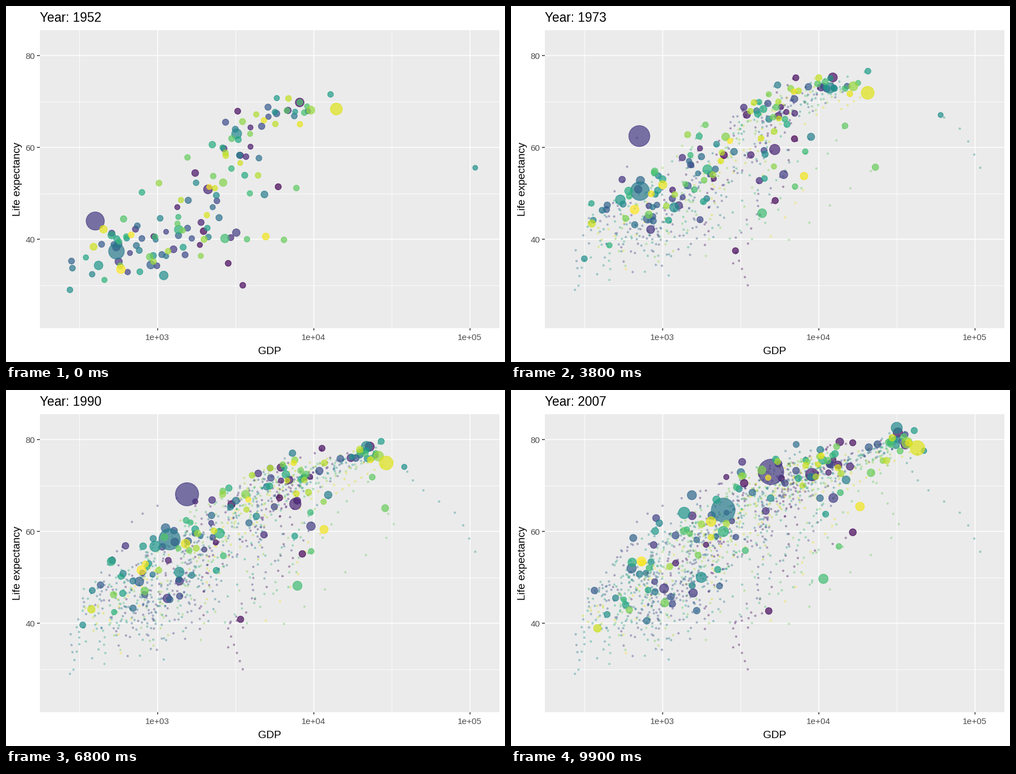
Write a matplotlib script that moves like this. It is 885 px wide and 632 px high and loops after 10000 ms.

```python
import numpy as np
import matplotlib.pyplot as plt
from matplotlib.animation import FuncAnimation

W, H, DPI = 885, 632, 100
FRAMES, STEP = 100, 9              # one survey year every STEP frames
SURVEYS, N = 12, 142
U = np.linspace(0, 1, SURVEYS)     # progress from 1952 to 2007
PT = 72 / DPI                      # points per pixel

plt.rcParams["font.family"] = "Liberation Sans"


def size_of(pop):
    """Bubble size in mm for a population in millions."""
    return 2 + 10 * (np.sqrt(pop) - 0.245) / (36.31 - 0.245)


def diameter(mm):
    return 3.664 * np.asarray(mm) + 1.22


def to_x(lg):
    return 268.5 + 277 * (lg - 3)


def to_y(life):
    return 414.3 - 8.15 * (life - 40)


# Landmark bubbles: rank, populations at both ends, evenly spaced key points
LANDMARKS = [
    (24, 556, 1319, [400, 506, 652, 870, 1460, 2400, 4959],
     [44, 45.9, 61.5, 64.8, 67.8, 70.6, 73]),
    (58, 372, 1110, [547, 780, 2452], [37.4, 54.5, 64.7]),
    (134, 157, 301, [13990, 23200, 42951], [68.4, 73, 78.2]),
    (71, 0.2, 2.5, [108400, 85000, 45000, 36000, 47300],
     [55.6, 63.5, 70.2, 75.4, 77.6]),
    (14, 57, 190, [2109, 6900, 9066], [50.9, 62.2, 72.4]),
    (66, 86, 127, [3217, 17500, 31656], [63, 76, 82.6]),
    (109, 4, 27.6, [6460, 34000, 21655], [39.9, 60.5, 72.8]),
    (3, 4.2, 12.4, [3521, 2780, 4797], [30, 39.8, 42.7]),
]

# Groups: count, then (mean, sd) of log income and life at start and end, hump
GROUPS = [
    (18, (3.88, 0.15), (4.50, 0.09), (68.5, 2.5), (80.0, 1.0), 0),
    (15, (3.58, 0.15), (4.10, 0.22), (62.0, 4.0), (75.5, 1.7), 3),
    (25, (3.45, 0.22), (3.85, 0.24), (53.0, 7.5), (73.0, 3.0), 1),
    (21, (3.05, 0.30), (3.60, 0.42), (45.0, 7.0), (69.5, 5.0), 1),
    (49, (2.95, 0.26), (3.10, 0.34), (39.0, 4.5), (53.5, 7.5), 5),
    (6, (3.62, 0.15), (4.15, 0.15), (44.0, 5.0), (63.0, 9.0), 4),
]


def build():
    lg, life, mm = (np.zeros((N, SURVEYS)) for _ in range(3))

    def put(k, p0, p1, x, y):
        lg[k], life[k] = x, y
        mm[k] = size_of(p0) + (size_of(p1) - size_of(p0)) * U

    def through(points):
        return np.interp(U, np.linspace(0, 1, len(points)), points)

    for k, p0, p1, gdp, age in LANDMARKS:
        put(k, p0, p1, through(np.log10(gdp)), through(age))

    rng = np.random.default_rng(7)
    free = list(rng.permutation(np.flatnonzero(mm[:, 0] == 0)))
    for count, g0, g1, a0, a1, hump in GROUPS:
        for _ in range(count):
            # start and end values correlate, as do income and life
            z = np.clip(rng.normal(size=4), -2, 2)
            z[1] = 0.7 * z[0] + 0.7 * z[1]
            z[2] = 0.5 * z[0] + 0.85 * z[2]
            z[3] = 0.5 * z[1] + 0.4 * z[2] + 0.7 * z[3]
            x0, x1, y0, y1 = (m + s * v for (m, s), v in zip((g0, g1, a0, a1), z))
            drift = np.cumsum(rng.normal(0, 0.04, SURVEYS))
            drift -= drift[0] + (drift[-1] - drift[0]) * U
            x = np.maximum(x0 + (x1 - x0) * U + drift, 2.44)
            y = y0 + (y1 - y0) * U ** 0.8
            y += hump * rng.uniform(0.2, 1.5) * np.sin(np.pi * U)
            pop = np.clip(rng.lognormal(1.5, 1.1), 0.15, 50)
            put(free.pop(), pop, pop * rng.uniform(1.2, 3.4), x,
                np.clip(y, 29, 82))
    return to_x(lg), to_y(life), mm


X, Y, MM = build()
COLORS = plt.get_cmap("viridis")(np.arange(N) / (N - 1))

fig = plt.figure(figsize=(W / DPI, H / DPI), dpi=DPI, facecolor="white")
ax = fig.add_axes([0, 0, 1, 1])
ax.set(xlim=(0, W), ylim=(H, 0))
ax.axis("off")

LEFT, RIGHT, TOP, BOTTOM = 60, 875, 43, 571.5
ax.add_patch(plt.Rectangle((LEFT, TOP), RIGHT - LEFT, BOTTOM - TOP,
                           fc="#EBEBEB", ec="none", zorder=0))


def line(xs, ys, width, color="white"):
    ax.plot(xs, ys, color=color, lw=width * PT, solid_capstyle="butt", zorder=1)


def text(x, y, s, px, color="black", **kw):
    kw = {"va": "baseline", **kw}
    return ax.text(x, y, s, fontsize=px * PT, color=color, **kw)


for lg in (2.5, 3.5, 4.5):
    line([to_x(lg)] * 2, [TOP, BOTTOM], 0.9)
for age in (30, 50, 70):
    line([LEFT, RIGHT], [to_y(age)] * 2, 0.9)
for lg in (3, 4, 5):
    line([to_x(lg)] * 2, [TOP, BOTTOM], 1.5)
    line([to_x(lg)] * 2, [BOTTOM, BOTTOM + 4.7], 1.5, "#333333")
    text(to_x(lg), 593, f"1e+0{lg}", 15.3, "#4D4D4D", ha="center")
for age in (40, 60, 80):
    line([LEFT, RIGHT], [to_y(age)] * 2, 1.5)
    line([LEFT - 4.7, LEFT], [to_y(age)] * 2, 1.5, "#333333")
    text(51.5, to_y(age) + 5.5, str(age), 15.3, "#4D4D4D", ha="right")

text(467.5, 618, "GDP", 19, ha="center")
text(29.5, 307, "Life expectancy", 19, rotation=90, ha="right", va="center")
title = text(60, 28.5, "", 22.8, ha="left")


def dots(x, y, mm, alpha, z):
    return ax.scatter(x, y, s=(diameter(mm) * PT) ** 2, c=COLORS, alpha=alpha,
                      edgecolors=COLORS, linewidths=1.2 * PT, zorder=z)


marks = [dots(X[:, j], Y[:, j], np.full(N, 0.5), 0.3, 2)
         for j in range(SURVEYS - 1)]
bubbles = dots(X[:, 0], Y[:, 0], MM[:, 0], 0.7, 3)


def update(i):
    j = min(i // STEP, SURVEYS - 2)
    t = i / STEP - j

    def mix(a):
        return a[:, j] + (a[:, j + 1] - a[:, j]) * t

    bubbles.set_offsets(np.column_stack([mix(X), mix(Y)]))
    bubbles.set_sizes((diameter(mix(MM)) * PT) ** 2)
    for n, mark in enumerate(marks):
        mark.set_visible(n * STEP < i)
    title.set_text(f"Year: {round(1952 + 5 * i / STEP)}")
    return [bubbles, title, *marks]


anim = FuncAnimation(fig, update, frames=FRAMES, interval=100, repeat=True,
                     repeat_delay=0, blit=False)
plt.show()
```
